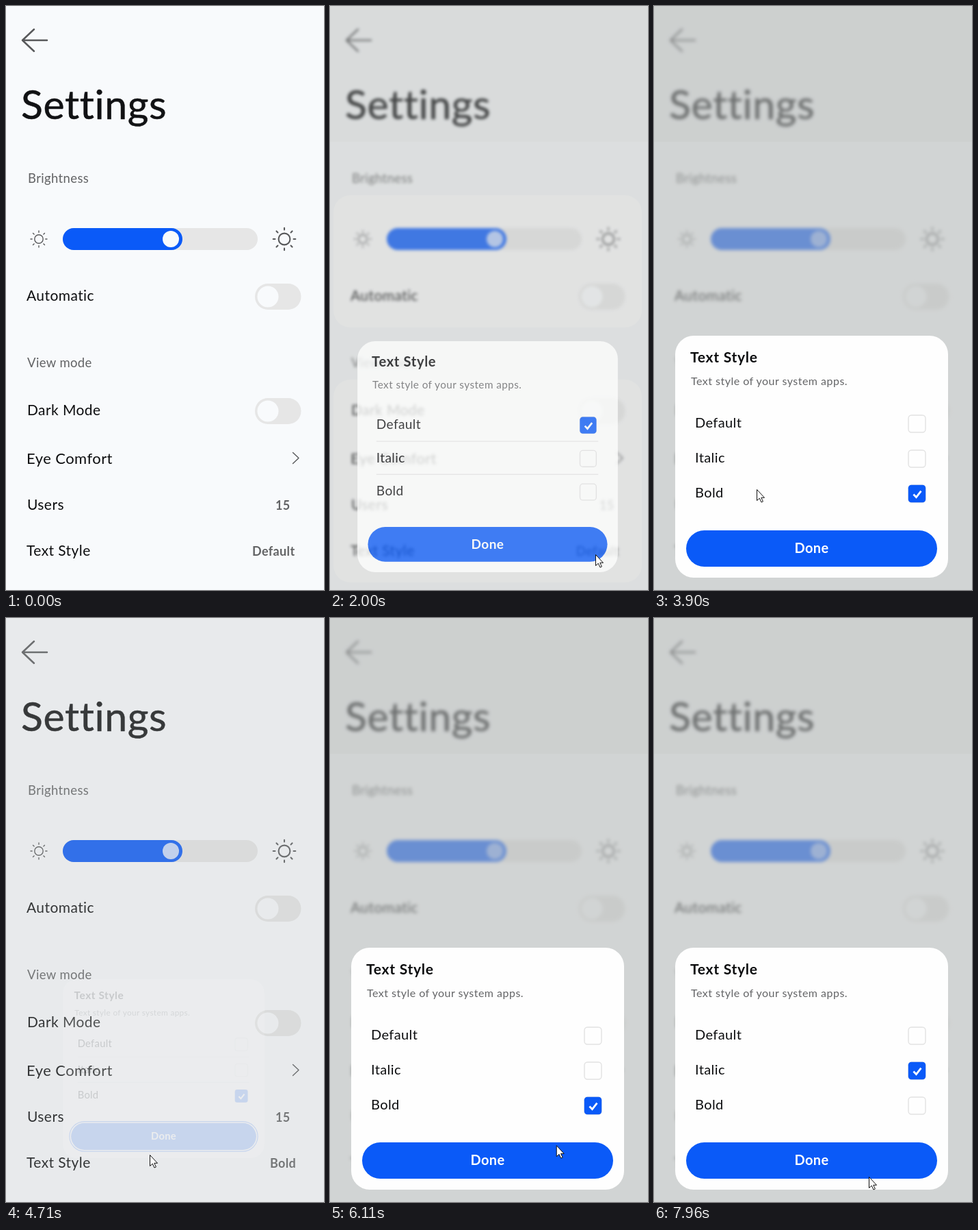
Write an HTML page that moves like this. It is 465 px wide and 852 px high and loops after 7.99 s.

```html
<!DOCTYPE html>
<html lang="en">
<head>
<meta charset="utf-8">
<title>Settings</title>
<style>
  html, body { margin: 0; width: 100%; height: 100%; overflow: hidden; background: #f8fafc; }
  svg { display: block; width: 465px; height: 852px; }
  text { font: 21px Lato, "Open Sans", sans-serif; letter-spacing: .02em; fill: #0c0d0f; }
  .heading { font-size: 59px; letter-spacing: .01em; fill: #111214; stroke: #111214; stroke-width: .5; stroke-linejoin: round; }
  .label { font-size: 18.5px; fill: #626365; }
  .value { font-size: 18px; font-weight: 700; fill: #626365; }
  .strong { font-size: 22px; }
  .title { font-weight: 700; letter-spacing: .035em; }
  .note { font-size: 16px; letter-spacing: .03em; fill: #646567; }
  .option { font-size: 20px; }
  .done { font-size: 20px; font-weight: 700; fill: #fff; text-anchor: middle; }
  .icon { fill: none; stroke: #58595b; stroke-linecap: round; stroke-linejoin: round; }
  .track { fill: #e6e6e6; }
  .knob { fill: #f8fafc; }
  .blue { fill: #0a5af8; }
</style>
</head>
<body>
<svg viewBox="0 0 465 852">
  <rect id="shade" width="465" height="852" opacity="0"/>
  <rect id="header" width="465" height="198" opacity="0"/>
  <g id="cards" fill="#f8f9f8" opacity="0">
    <rect x="5" y="276" width="451" height="193" rx="25"/>
    <rect x="5" y="545" width="451" height="296" rx="25"/>
  </g>
  <g id="page">
    <path class="icon" stroke-width="2.5" d="M60 50H24M41 34L24 50L41 66"/>
    <text class="heading" x="22" y="165">Settings</text>
    <text class="label" x="32" y="258">Brightness</text>
    <rect class="track" x="83" y="324" width="285" height="32" rx="16"/>
    <rect class="blue" x="83" y="324" width="175" height="32" rx="16"/>
    <circle class="knob" id="thumb" cx="241" cy="340" r="12"/>
    <text x="30" y="430">Automatic</text>
    <text class="label" x="31" y="527">View mode</text>
    <text x="31" y="597">Dark Mode</text>
    <text class="strong" x="30" y="668">Eye Comfort</text>
    <path class="icon" stroke-width="1.4" d="M419.5 651.5L428 659.5L419.5 667.5"/>
    <text x="31" y="735">Users</text>
    <text class="value" x="394" y="735">15</text>
    <text x="30" y="802">Text Style</text>
    <text class="value" id="value" x="360" y="802">Default</text>
  </g>
  <rect id="veil" width="465" height="852" fill="#b3b8b5" opacity="0"/>
  <g id="dialog" opacity="0">
    <rect x="31" y="481" width="399" height="353" rx="27" fill="#fefefe"/>
    <text class="title" x="53" y="520">Text Style</text>
    <text class="note" x="54" y="553">Text style of your system apps.</text>
    <path id="dividers" stroke="#dedede" d="M60 634H400M60 684.5H400"/>
    <rect class="blue" x="47" y="765" width="367" height="53" rx="26.5"/>
    <rect id="ring" x="44" y="762" width="373" height="59" rx="29.5" fill="none" stroke="#0a5af8" stroke-width="1.5"/>
    <text class="done" x="230.5" y="798">Done</text>
  </g>
  <path id="cursor" fill="#fff" stroke="#111" stroke-linejoin="round"
        d="M.5 .5V16.5L4.3 13.2L7 19L9.4 17.9L6.8 12.3H11.5Z"/>
</svg>
<script>
const LOOP = 7990;
const $ = id => document.getElementById(id);
const clamp = v => Math.min(1, Math.max(0, v));
const span = (t, a, b) => clamp((t - a) / (b - a));
const ease = u => u < .5 ? 4 * u ** 3 : 1 - (2 - 2 * u) ** 3 / 2;
const fade = (id, v) => $(id).setAttribute('opacity', v);
const add = (id, markup) => $(id).insertAdjacentHTML('beforeend', markup);

function sun(x, y, r, inner, outer, width) {
  let d = '';
  for (let i = 0; i < 8; i++) {
    const c = Math.cos(i * Math.PI / 4), s = Math.sin(i * Math.PI / 4);
    d += `M${x + c * inner} ${y + s * inner}L${x + c * outer} ${y + s * outer}`;
  }
  add('page', `<g class="icon" stroke-width="${width}"><circle cx="${x}" cy="${y}" r="${r}"/><path d="${d}"/></g>`);
}

function toggle(y) {
  add('page', `<rect class="track" x="364" y="${y - 19}" width="67.5" height="38" rx="19"/>
    <circle class="knob" cx="383" cy="${y}" r="15.5"/>`);
}

function option(name, y) {
  add('dialog', `<text class="option" x="60" y="${y + 5.5}">${name}</text>
    <rect x="372" y="${y - 12.5}" width="25" height="25" rx="4.5" fill="none" stroke="#e2e2e2" stroke-width="1.4"/>
    <g id="${name}"><rect class="blue" x="371.8" y="${y - 12.7}" width="25.4" height="25.4" rx="4.5"/>
    <path d="M379.5 ${y + 1}l4 4.2l7-9" fill="none" stroke="#fff" stroke-width="2.8"/></g>`);
}

sun(48, 340, 6.2, 9.8, 12, 1.4);
sun(407, 340, 8.4, 13.5, 16.3, 2.1);
toggle(424);
toggle(591);
option('Default', 609.5);
option('Italic', 660.5);
option('Bold', 711.5);

// Each move: start time, end time, destination.
const moves = [
  [470, 1170, 388, 800],
  [2730, 3500, 150, 705],
  [3930, 4340, 210, 783],
  [4800, 5290, 400, 805],
  [5765, 6640, 120, 660],
  [7510, 7965, 314, 815]
];

function cursorAt(t) {
  let x = 360, y = 853;
  for (const [a, b, toX, toY] of moves) {
    const k = ease(span(t, a, b));
    x += (toX - x) * k;
    y += (toY - y) * k;
  }
  return `translate(${x} ${y})`;
}

function draw(t) {
  const closing = t >= 4530 && t < 5400;
  const p = t < 4530 ? span(t, 1715, 2095) : span(t, 5580, 5960);
  const q = span(t, 4530, 4820);
  const bump = closing ? 0 : 4 * p * (1 - p);
  const dim = closing ? (1 - q) ** .9 : p ** 2;
  const scale = closing ? 1 - .42 * q : 1 - .14 * (1 - p) ** .8;
  const blur = closing ? 2.6 * clamp(1 - 2 * q) : 2.6 * p ** .6;

  fade('shade', .05 * bump);
  fade('cards', bump);
  fade('header', .04 * (closing ? clamp(1 - 2 * q) : span(p, .55, .95)));
  fade('veil', .57 * dim);
  fade('thumb', 1 - .5 * dim);
  fade('dialog', closing ? (1 - q) ** 2 : p);
  fade('dividers', closing || t < 2095 ? 1 : 0);
  fade('ring', closing ? 1 : 0);
  $('page').style.filter = blur > .02 ? `blur(${blur}px)` : 'none';
  $('dialog').setAttribute('transform',
    `translate(230.5 657.5) scale(${scale}) translate(-230.5 -657.5)`);

  const bold = span(t, 3540, 3720), italic = span(t, 7160, 7340);
  fade('Default', 1 - bold);
  fade('Bold', bold - italic);
  fade('Italic', italic);

  const saved = t >= 4530;
  $('value').textContent = saved ? 'Bold' : 'Default';
  $('value').setAttribute('x', saved ? 386 : 360);
  $('cursor').setAttribute('transform', cursorAt(t));
}

const start = performance.now();
function tick() {
  draw((performance.now() - start) % LOOP);
  requestAnimationFrame(tick);
}
tick();
</script>
</body>
</html>
```
